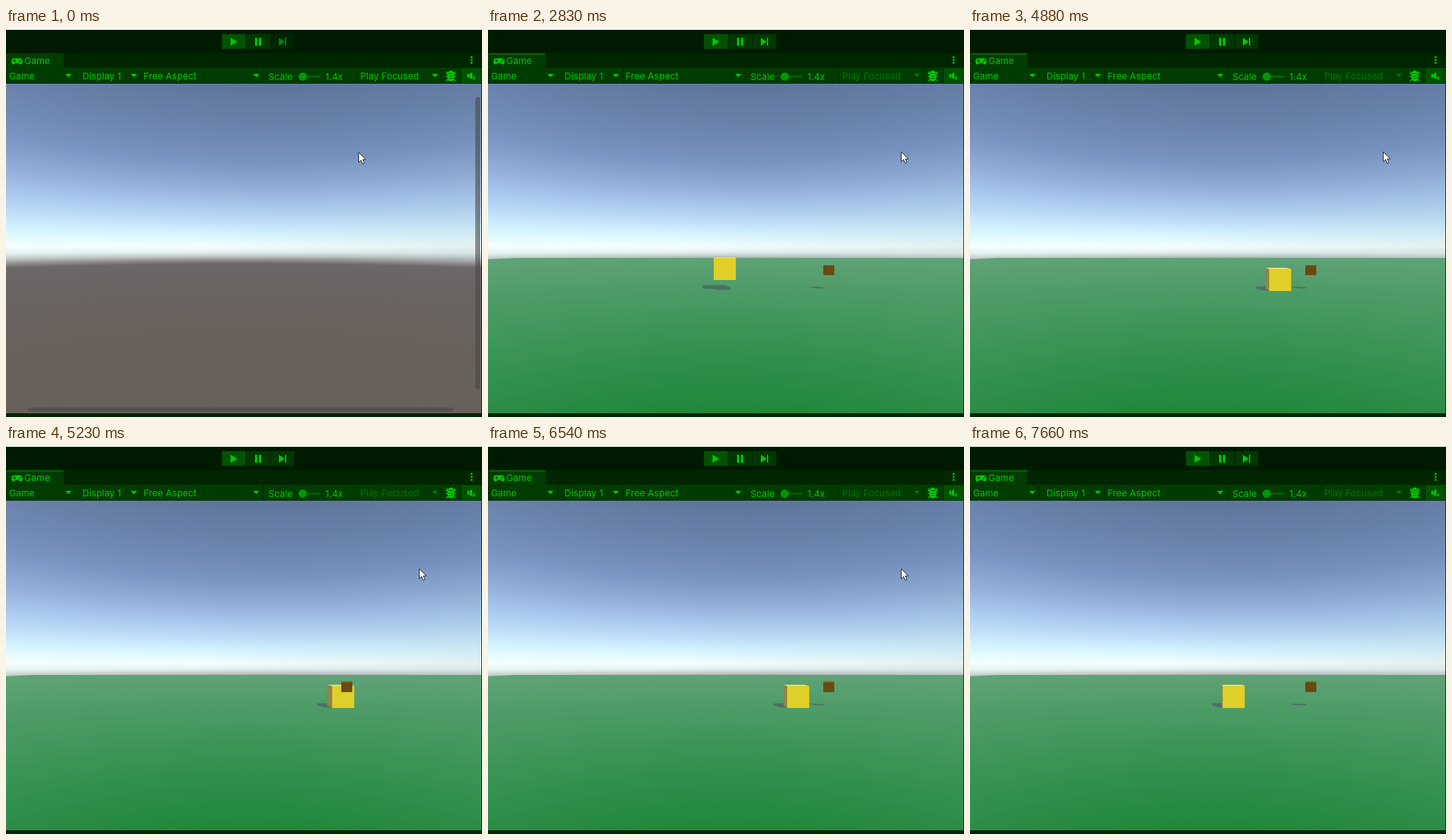
Write an HTML page with a canvas that moves like this. It is 778 by 636 pixels and loops after 8070 ms.

```html
<!DOCTYPE html>
<html lang="en">
<head>
<meta charset="utf-8">
<title>Game view</title>
<style>
html, body { margin: 0; width: 100%; height: 100%; overflow: hidden; background: #001a00; }
canvas, svg { position: absolute; left: 0; top: 0; display: block; }
text { font: 15px Inter, "Open Sans", sans-serif; letter-spacing: .12px; fill: #00c800; }
.ink { fill: #00c800; }
.line { stroke: #00c800; fill: none; }
</style>
</head>
<body>
<canvas id="view" width="778" height="636"></canvas>
<svg width="778" height="636" viewBox="0 0 778 636">
  <defs>
    <path id="drop" class="ink" d="M0 0h10l-5 5.5z"/>
  </defs>

  <!-- play bar -->
  <rect width="778" height="41" fill="#001a00"/>
  <rect width="778" height="3" fill="#f4fff4"/>
  <rect x="353" y="10" width="39" height="24" fill="#005200"/>
  <rect x="393" y="10" width="39" height="24" fill="#003800"/>
  <rect id="stepBox" x="433" y="10" width="38" height="24" fill="#003800"/>
  <path class="ink" d="M367 16l11 6.5-11 6.5zM407 16h3.6v13h-3.6zM413.400 16h3.600v13h-3.600z"/>
  <path id="stepIcon" class="ink" d="M446 16l9.500 6.500-9.500 6.500zM456 16h2v13h-2z"/>

  <!-- tab row -->
  <rect y="41" width="778" height="25" fill="#002600"/>
  <path d="M0 66V44q0-3 3-3h88q3 0 3 3v22z" fill="#003c00"/>
  <path id="focusLine" d="M1 43.500V43q0-2 3-2h86q4 0 4 2v.5z" fill="#006400"/>
  <path class="ink" fill-rule="evenodd" d="M13 49.500h10q4 0 4 5 0 5-3 5-1.500 0-4-2.500h-4q-2.500 2.500-4 2.500-3 0-3-5 0-5 4-5zM13 51.200v1.600h-1.600v1.500H13v1.600h1.500v-1.600h1.600v-1.500h-1.600v-1.600zM21 54h2v2h-2zM23.300 51.500h2v2h-2z"/>
  <text x="30" y="59">Game</text>
  <path class="ink" d="M759.500 46h3v3h-3zM759.500 50.700h3v3h-3zM759.500 55.400h3v3h-3z"/>

  <!-- tool row -->
  <rect y="65" width="778" height="26" fill="#003c00"/>
  <rect x="745" y="66" width="32" height="24" fill="#005200"/>
  <path d="M0 90.500h778M.5 66v25M113.500 66v25M220.500 66v25M420.500 66v25M574.500 66v25M711.500 66v25M744.500 66v25" stroke="#002200" fill="none"/>
  <text x="5" y="84">Game</text><use href="#drop" x="97" y="75"/>
  <text x="125" y="84">Display 1</text><use href="#drop" x="204" y="75"/>
  <text x="225" y="84">Free Aspect</text><use href="#drop" x="404" y="75"/>
  <text x="429" y="85">Scale</text>
  <path d="M478 79.500h36" stroke="#006a00" stroke-width="2.500"/>
  <circle cx="485" cy="79.500" r="6.800" fill="#009800"/>
  <text x="522" y="85">1.4x</text>
  <g id="focusMenu"><text x="579" y="84">Play Focused</text><use href="#drop" x="696" y="75"/></g>
  <g>
    <path class="line" stroke-width="1.500" d="M720 71l3 4M734 71l-3 4M718.500 79H735.500M719 87l4-4M735 87l-4-4M719 73.500l4 2.500M735 73.500l-4 2.500"/>
    <path class="ink" d="M722.500 74q0-4.500 4.500-4.500t4.500 4.500zM721.500 75h11v6q0 6-5.500 6t-5.500-6z"/>
    <path d="M724 79h6M724 82.500h6" stroke="#004800"/>
  </g>
  <path class="ink" d="M754 75h3v6h-3zM758 75l4-3v12l-4-3z"/>
  <path class="line" stroke-width="1.300" d="M763 79.500l4 4.500M767 79.500l-4 4.500"/>

  <!-- view frame -->
  <rect y="630" width="778" height="6" fill="#002600"/>
  <path d="M0 630.500h778M777.500 91v545" stroke="#001600" fill="none"/>
  <g id="bars" fill="#484848" fill-opacity=".6">
    <rect x="767" y="113" width="8" height="477" rx="3"/>
    <rect x="36" y="620.500" width="695" height="7" rx="3"/>
  </g>

  <g id="world">
    <path fill="#4b7163" d="M523 423l13-.3 14 1.600v1.500l-13-.2-7-1.200z"/>
    <path id="shade" fill="#4b7163"/>
    <path id="side" fill="#8f8444"/>
    <path id="top" fill="#ebe075"/>
    <rect id="front" width="36" height="36" fill="#e0cf28"/>
    <rect id="boxTop" x="548" y="386" width="18" height="2" fill="#8a6c38"/>
    <rect x="548" y="388" width="18" height="16" fill="#6a4a0e"/>
  </g>
  <path id="cursor" d="M.5.5v16.200l3.800-3.600 2.600 6 2.700-1.200-2.600-5.800h5z" fill="#fff" stroke="#111"/>
</svg>

<script>
const LOOP = 8070, TICK = 50, CX = 389, CY = 360, FOCAL = 467;
const SPAWN = 2830, FALL = 400, DROP = 18, DEPTH = 0.94;
const $ = id => document.getElementById(id);

// Colours by height above (-) or below (+) the eye level
const SKY = [
  [-270, '#5f769b'], [-225, '#677ea6'], [-180, '#6f88b2'], [-140, '#7a95c1'],
  [-100, '#93aed8'], [-70, '#a9c8ee'], [-50, '#b9d9f6'], [-30, '#cfeefe'],
  [-15, '#e2faff'], [-3, '#f4ffff'], [6, '#e6f3f2'], [13, '#c2cac9'],
  [19, '#949493'], [25, '#6c6768'], [60, '#6a6463'], [130, '#69625c'], [270, '#67605a']
];
const GRASS = [[16, '#5fa276'], [60, '#509c69'], [130, '#3c9558'], [200, '#2c8d48'], [270, '#21873a']];

// Static tracks: [time, value...]
const CUBE_X = [[4010, 369], [4810, 481], [4880, 489], [5530, 571], [5940, 571],
  [6540, 489], [6710, 460], [7060, 413]];
const CURSOR = [[0, 576, 203], [250, 675, 202], [7110, 675, 202],
  [7560, 730, 557], [7610, 742, 617], [7660, 746, 660]];

function paint(stops, yTop) {
  const layer = document.createElement('canvas');
  layer.width = 778;
  layer.height = 636;
  const g = layer.getContext('2d');
  for (let x = 0; x < 777; x++) {
    const k = Math.hypot(1, (x - CX) / FOCAL);
    const lo = stops[0][0], span = stops[stops.length - 1][0] - lo;
    const fill = g.createLinearGradient(0, CY + lo * k, 0, CY + (lo + span) * k);
    for (const [h, c] of stops) fill.addColorStop((h - lo) / span, c);
    g.fillStyle = fill;
    const y = yTop(x);
    g.fillRect(x, y, 1, 630 - y);
  }
  return layer;
}

const sky = paint(SKY, () => 91);
const sg = sky.getContext('2d');
const dim = sg.createLinearGradient(300, 0, 778, 0);
dim.addColorStop(0, 'rgba(40,70,100,0)');
dim.addColorStop(1, 'rgba(40,70,100,.08)');
sg.fillStyle = dim;
sg.fillRect(0, 91, 777, 289);
const grass = paint(GRASS, x => x < 45 ? 378 - 2 * x / 45 : 376);

const ctx = $('view').getContext('2d');
let shown = null;
function drawScene(live) {
  if (live === shown) return;
  shown = live;
  ctx.drawImage(sky, 0, 0);
  if (live) ctx.drawImage(grass, 0, 0);
}

const mix = (a, b, u) => a + (b - a) * u;
const clamp = v => Math.max(0, Math.min(1, v));

// Linear tracks, held for one tick at a time
function at(keys, t) {
  if (t <= keys[0][0]) return keys[0].slice(1);
  for (let i = 1; i < keys.length; i++) {
    const a = keys[i - 1], b = keys[i];
    if (t < b[0]) {
      const u = Math.floor((t - a[0]) / TICK) * TICK / (b[0] - a[0]);
      return a.slice(1).map((v, n) => mix(v, b[n + 1], u));
    }
  }
  return keys[keys.length - 1].slice(1);
}

// Shadow outline, first in the air and then on the ground
const AIR = [[-18, 420.5], [18, 420.5], [27, 424], [27, 428], [8, 428.5], [-5, 426.5], [-18, 426]];
const LAND = [[-16, 422.5], [8, 422], [34, 426], [36, 430], [5, 430], [-7, 428.5], [-16, 426]];

const outline = pts => 'M' + pts.map(p => p.join(' ')).join('L') + 'z';
const back = (x, y) => [CX + (x - CX) * DEPTH, CY + (y - CY) * DEPTH];

function drawCube(t) {
  const [x] = at(CUBE_X, t);
  const age = Math.floor((t - SPAWN) / TICK) * TICK;
  const fall = clamp(age / FALL) ** 2;
  const y = 376 + DROP * fall, r = x + 36, b = y + 36;
  const edge = Math.min(x, back(x, y)[0]);
  $('shade').setAttribute('d', outline(AIR.map((p, i) =>
    [edge + mix(p[0], LAND[i][0], fall), mix(p[1], LAND[i][1], fall)])));
  $('top').setAttribute('d', outline([[x, y], back(x, y), back(r, y), [r, y]]));
  $('side').setAttribute('d', x > CX ? outline([[x, y], back(x, y), back(x, b), [x, b]]) : '');
  $('front').setAttribute('x', x);
  $('front').setAttribute('y', y);
  $('boxTop').style.display = t >= 4930 ? '' : 'none';
}

function draw(t) {
  const live = t >= SPAWN;
  drawScene(live);
  $('world').style.display = live ? '' : 'none';
  if (live) drawCube(t);

  const ready = t >= 400;
  $('stepBox').setAttribute('fill', ready ? '#003800' : '#002600');
  $('stepIcon').style.opacity = ready ? 1 : .6;
  $('focusLine').style.display = t >= 50 ? '' : 'none';
  $('focusMenu').style.opacity = t >= 50 ? .42 : 1;
  $('bars').style.opacity = 1 - clamp(Math.floor(t / TICK) * TICK / 250);

  const [cx, cy] = at(CURSOR, t);
  $('cursor').setAttribute('transform', `translate(${Math.round(cx)} ${Math.round(cy)})`);
}

const start = performance.now();
function frame() {
  draw((performance.now() - start) % LOOP);
  requestAnimationFrame(frame);
}
frame();
</script>
</body>
</html>
```
